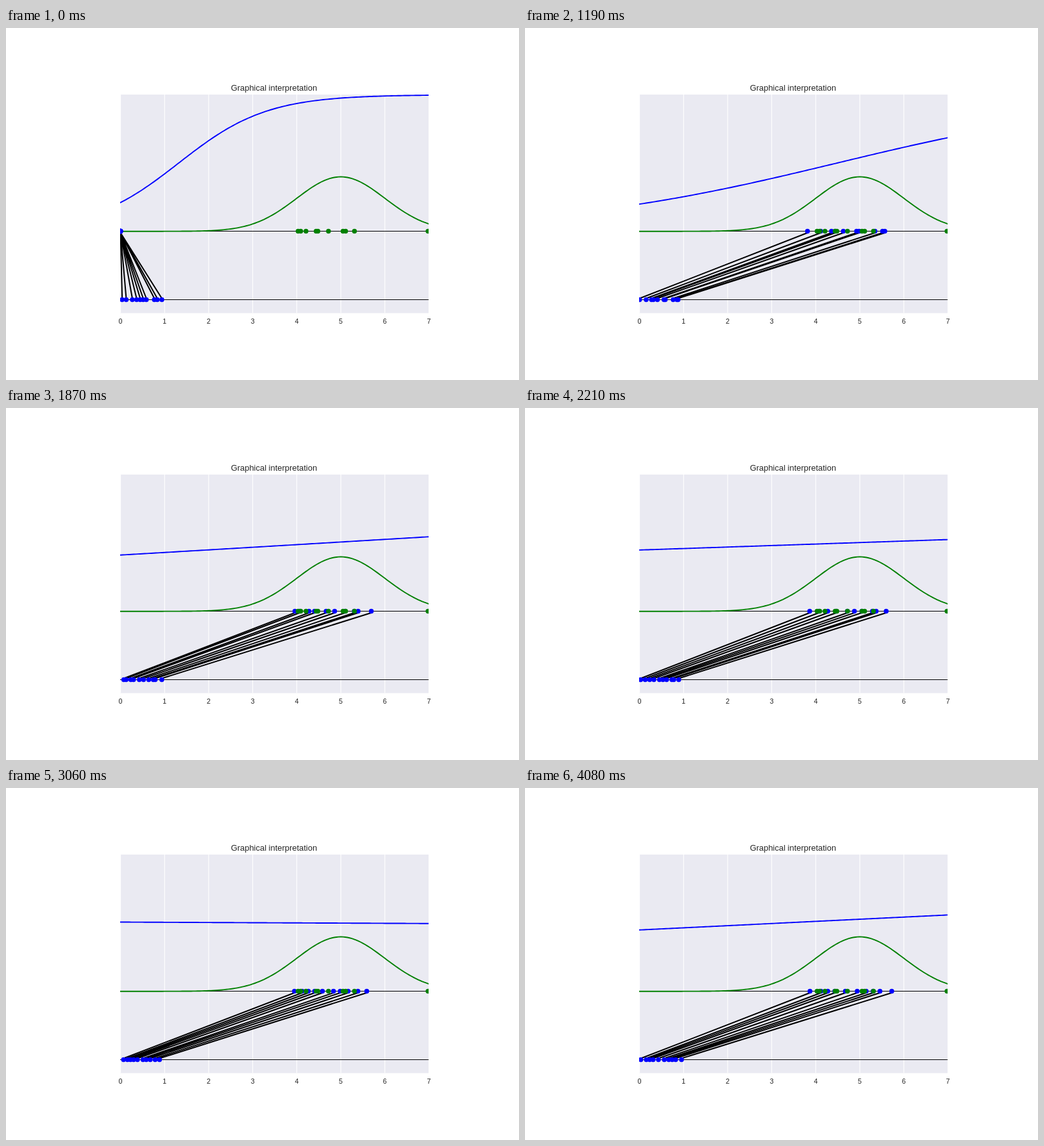
An HTML page for the animation above (4.25 s loop, 800 px wide and 550 px high).

```html
<!DOCTYPE html>
<html lang="en">
<head>
<meta charset="utf-8">
<title>Graphical interpretation</title>
<style>
html, body { margin: 0; width: 100%; height: 100%; overflow: hidden; background: #fff; }
svg { display: block; width: 800px; height: 550px; }
text { font-family: "Liberation Sans", Arial, sans-serif; fill: #262626; text-anchor: middle; }
</style>
</head>
<body>
<svg viewBox="0 0 800 550">
  <defs><clipPath id="area"><rect x="178" y="104" width="481" height="341.5"/></clipPath></defs>
  <rect x="178" y="104" width="481" height="341.5" fill="#eaeaf2"/>
  <text x="417.9" y="98.2" font-size="12.95">Graphical interpretation</text>
  <g id="ticks" font-size="10.75"></g>
  <g clip-path="url(#area)" fill="none">
    <g id="grid" stroke="#fff" stroke-width="1.1"></g>
    <path id="links" stroke="#000" stroke-width="2"/>
    <path d="M178 317.5H660M178 424.5H660" stroke="#000" stroke-width="1.05"/>
    <path id="decision" stroke="#00f" stroke-width="1.9"/>
    <path id="density" stroke="#008000" stroke-width="1.9"/>
    <g id="fakes" fill="#00f"></g>
    <g id="reals" fill="#008000"></g>
  </g>
</svg>
<script>
const STEP = 170, FRAMES = 25, COUNT = 10;
const LEFT = 178.6, UNIT = 68.7, BASE = 317.7, HEIGHT = 213.4;
const HIGH = 317.5, LOW = 424.5;
const $ = id => document.getElementById(id);
const px = x => LEFT + x * UNIT;
const py = y => BASE - y * HEIGHT;

const reals = [4.03, 4.09, 4.21, 4.44, 4.48, 4.72, 5.05, 5.11, 5.31, 6.98];

// step, slope and bias of the discriminator
const training = [
  [0, 1, -1.32],
  [2, 1.4, -2.8],
  [4, 3.15, -8.6],
  [7, 0.31, -1.39],
  [11, 0.077, -0.355],
  [16, -0.006, 0.02],
  [21, -0.006, 0.04],
  [24, 0.063, -0.203]
];

function add(parent, tag, attrs) {
  const el = document.createElementNS("http://www.w3.org/2000/svg", tag);
  for (const k in attrs) el.setAttribute(k, attrs[k]);
  return $(parent).appendChild(el);
}

const dot = (group, x, y) => add(group, "circle", { cx: x, cy: y, r: 3.75 });

function curve(fn) {
  let d = "";
  for (let i = -1; i <= 141; i++) {
    const x = i / 20;
    d += (d ? "L" : "M") + px(x).toFixed(2) + " " + py(fn(x)).toFixed(2);
  }
  return d;
}

// repeatable noise in 0..1
function random(n) {
  const v = Math.sin(n * 12.9898 + 4.1) * 43758.5453;
  return v - Math.floor(v);
}

const sample = (frame, i) => 0.96 * (i + random(frame * COUNT + i)) / COUNT;

function discriminator(frame) {
  const i = training.findIndex(key => key[0] >= frame);
  const b = training[i], a = training[Math.max(0, i - 1)];
  const f = (frame - a[0]) / (b[0] - a[0] || 1);
  const [, w, bias] = a.map((v, k) => v + (b[k] - v) * f);
  return x => 1 / (1 + Math.exp(-w * x - bias));
}

// the generator learns its mapping over the first seven steps
function generator(frame) {
  const learned = Math.min(1, frame / 7) ** 1.78;
  return z => learned * (3.81 + 2.01 * z);
}

for (let i = 0; i <= 7; i++) {
  add("ticks", "text", { x: px(i), y: 461.6 }).textContent = i;
  add("grid", "path", { d: `M${px(i)} 104V445.5` });
}
reals.forEach(x => dot("reals", px(x), HIGH));
const upper = [], lower = [];
for (let i = 0; i < COUNT; i++) {
  upper.push(dot("fakes", LEFT, HIGH));
  lower.push(dot("fakes", LEFT, LOW));
}
$("density").setAttribute("d", curve(x => Math.exp(-((x - 5) ** 2) / 2) / Math.sqrt(2 * Math.PI)));

function draw(frame) {
  const map = generator(frame);
  let d = "";
  for (let i = 0; i < COUNT; i++) {
    const z = sample(frame, i), from = px(z), to = px(map(z));
    lower[i].setAttribute("cx", from);
    upper[i].setAttribute("cx", to);
    d += `M${from} ${LOW - 2}L${to} ${HIGH + 2.5}`;
  }
  $("links").setAttribute("d", d);
  $("decision").setAttribute("d", curve(discriminator(frame)));
}

const start = performance.now();
let shown = 0;
function tick(now) {
  const frame = Math.floor(Math.max(0, now - start) / STEP) % FRAMES;
  if (frame !== shown) draw(shown = frame);
  requestAnimationFrame(tick);
}
draw(0);
requestAnimationFrame(tick);
</script>
</body>
</html>
```
